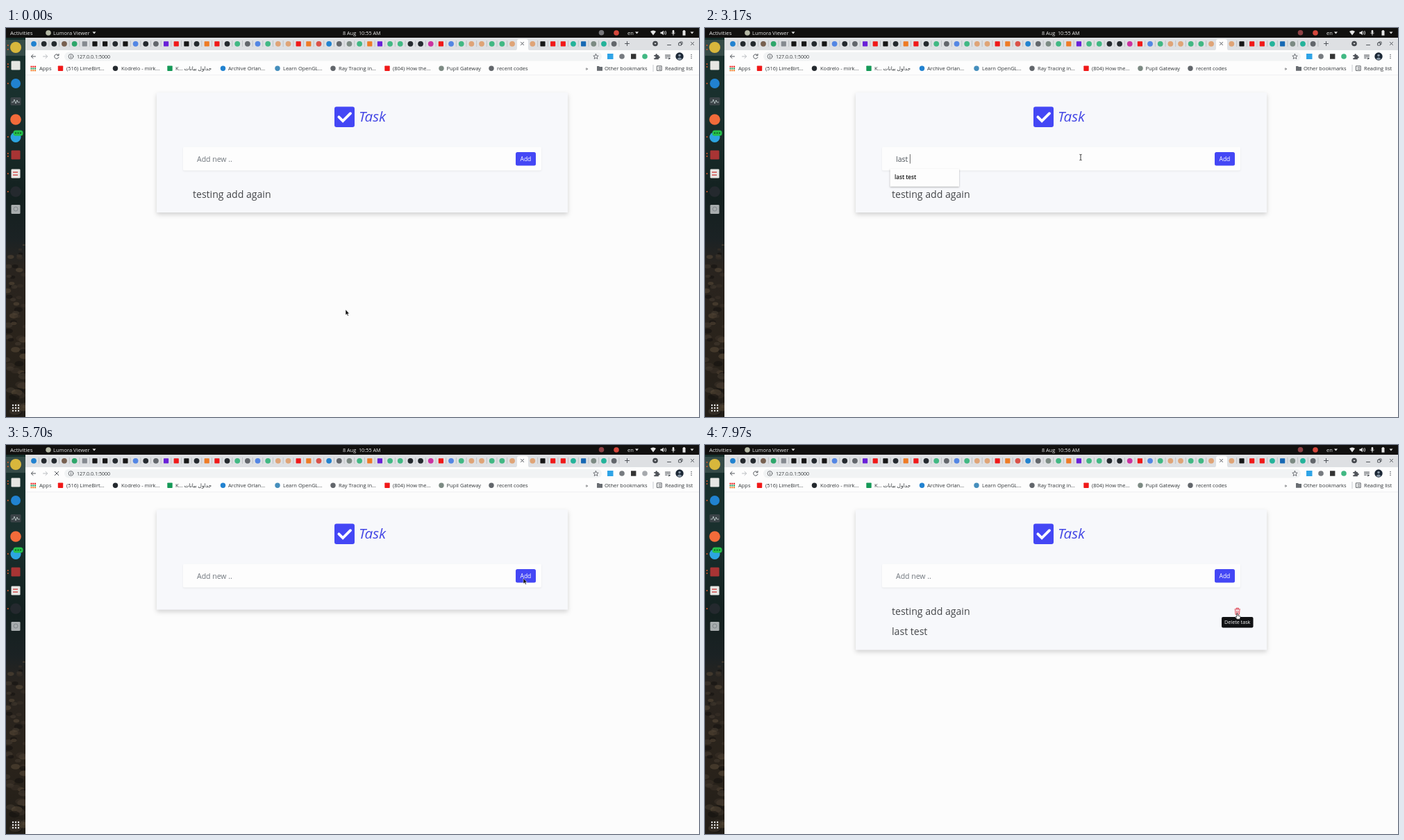
An HTML page that plays this animation: 998 px wide and 561 px high, repeating every 8 s.

```html
<!DOCTYPE html>
<html lang="en">
<head>
<meta charset="utf-8">
<title>Task list</title>
<style>
  html, body { margin: 0; width: 100%; height: 100%; overflow: hidden; background: #fcfcfc; }
  svg { display: block; width: 998px; height: 561px; }
  text { font-family: "Open Sans", "DejaVu Sans", sans-serif; white-space: pre; }
  .top { font-size: 7.5px; fill: #e6e6e6; }
  .mark { font-size: 7.5px; fill: #33373a; }
  .line { fill: none; stroke: #50545a; stroke-width: 1; stroke-linecap: round; stroke-linejoin: round; }
  .item { font-size: 14.1px; fill: #444649; }
  .field { font-size: 10.5px; }
  .option { font-size: 8.1px; font-weight: 600; fill: #111; }
  #card { filter: drop-shadow(0 3px 3px rgba(0, 0, 0, .17)); }
  #menu { filter: drop-shadow(0 1px 1px rgba(0, 0, 0, .3)); }
  #box { filter: drop-shadow(0 1px 1px rgba(0, 0, 0, .07)); }
</style>
</head>
<body>
<svg viewBox="0 0 998 561">
  <defs>
    <linearGradient id="wall" x2="0" y2="1">
      <stop offset="0" stop-color="#17302c"/>
      <stop offset=".2" stop-color="#1a302e"/>
      <stop offset=".42" stop-color="#13201f"/>
      <stop offset=".53" stop-color="#1b2224"/>
      <stop offset=".6" stop-color="#29241f"/>
      <stop offset=".8" stop-color="#2a231b"/>
      <stop offset="1" stop-color="#221e18"/>
    </linearGradient>
    <clipPath id="side"><path d="M0 14H28V561H0z"/></clipPath>
  </defs>

  <!-- page -->
  <rect width="998" height="561" fill="#fcfcfc"/>
  <rect id="card" x="217" y="93" width="592" height="173" fill="#f7f8fb"/>
  <rect x="473" y="113.5" width="29" height="29.5" rx="3" fill="#4447f5"/>
  <path d="M479.4 128.4l5.7 5.7 10.9-10.9" fill="none" stroke="#fff" stroke-width="3.9" stroke-linecap="round"/>
  <text x="508" y="135.3" font-size="20.6" font-style="italic" fill="#4447e5">Task</text>
  <rect id="box" x="255" y="171.5" width="516" height="34" rx="2" fill="#fdfdfd"/>
  <text id="hint" class="field" x="275" y="192.5" fill="#70767d">Add new ..</text>
  <text id="typed" class="field" x="275" y="192.5" fill="#495057"></text>
  <path id="caret" d="M0 182v13.5" stroke="#444" stroke-width=".8"/>
  <rect x="734" y="179" width="29" height="19.5" rx="2.5" fill="#4447f5"/>
  <text x="740.5" y="191.8" font-size="8.5" fill="#fff">Add</text>
  <text id="first" class="item" x="269" y="244.8">testing add again</text>
  <text id="second" class="item" x="269" y="273.8">last test</text>
  <g id="trash" fill="none" stroke="#dc3545">
    <path d="M762.5 237h8.5M765 236.5v-1.2h3.5v1.2"/>
    <path d="M763.6 238l.4 6.3h5.5l.4-6.3M765.7 239v4M767.8 239v4" stroke-width=".9"/>
  </g>
  <g id="tip">
    <rect x="744" y="248" width="45.5" height="15.5" rx="2" fill="#111214"/>
    <text x="766.7" y="258.2" font-size="7.2" fill="#f4f4f4" text-anchor="middle">Delete task</text>
  </g>
  <g id="menu">
    <rect id="sheet" x="266.5" y="203" width="99.5" height="119" fill="#fdfdfd"/>
    <g id="options"></g>
  </g>

  <!-- browser -->
  <rect x="28" y="14" width="970" height="18" fill="#dee0e3"/>
  <rect x="28" y="32" width="970" height="35.5" fill="#fdfdfd"/>
  <path d="M28 67.8H998" stroke="#eceef0" stroke-width=".8"/>
  <path d="M734 32q2 0 2-3V19q0-3 3-3h10q3 0 3 3v10q0 3 2 3z" fill="#fdfdfd"/>
  <g id="tabs"></g>
  <path class="line" d="M741.5 20.5l4 4m0-4l-4 4M891.5 22.5h6m-3-3v6M952.5 24.5h5M969 21.5h3.5v3.5h-3.5zM970.5 21.5v-1.5h3.5v3.5h-1.3M986.5 20.5l4 4m0-4l-4 4"/>
  <circle cx="935" cy="22.5" r="3.8" fill="#44484d"/>
  <path d="M933.3 21.7h3.4l-1.7 2z" fill="#fff"/>
  <rect x="84" y="34.8" width="774" height="12.6" rx="6.3" fill="#f1f3f4"/>
  <path class="line" d="M42.5 41h-6m2.5-2.6L36.3 41l2.7 2.6"/>
  <path class="line" d="M53.5 41h6m-2.5-2.6l2.7 2.6-2.7 2.6" style="stroke:#b9bcc0"/>
  <path id="reload" class="line" d="M75.6 39.2a3.2 3.2 0 1 0 .4 3M76 37.5v2.3h-2.3"/>
  <path id="stop" class="line" d="M70.3 38.3l5.4 5.4m0-5.4l-5.4 5.4"/>
  <circle class="line" cx="93.5" cy="41" r="3.4" style="stroke-width:.8"/>
  <path class="line" d="M93.5 40.8v1.8M93.5 39.2v.1" style="stroke-width:.9"/>
  <text class="mark" x="102" y="43.8" style="font-size:7.1px">127.0.0.1:5000</text>
  <path class="line" d="M849.5 37.5l1.1 2.4 2.6.3-2 1.7.6 2.6-2.3-1.4-2.3 1.4.6-2.6-2-1.7 2.6-.3z" style="stroke-width:.8"/>
  <rect x="866" y="37" width="8.5" height="8" fill="#2fa4e7"/>
  <circle cx="887" cy="41" r="3.8" fill="#777b80"/>
  <rect x="900" y="37.3" width="7.4" height="7.4" fill="#333"/>
  <circle id="badge" cx="920" cy="41" r="3.8"/>
  <path d="M933.3 39h2.2a1.3 1.3 0 1 1 2.4 0h2v2a1.3 1.3 0 1 1 0 2.4v1.8h-6.6v-2.2a1.3 1.3 0 1 0 0-2z" fill="#50545a"/>
  <path class="line" d="M949.5 39h7M949.5 41h7M949.5 43.2h3"/>
  <path d="M954 42.2l3.5 1.6-3.5 1.8z" fill="#50545a"/>
  <circle cx="970" cy="41" r="5.7" fill="#1b2735"/>
  <path d="M966.5 44.5q3.5-4 7 0-3.5 3-7 0z" fill="#8795a4"/>
  <circle cx="970" cy="39.5" r="1.8" fill="#8795a4"/>
  <path d="M987 38.5v.1m0 2.4v.1m0 2.4v.1" class="line" style="stroke-width:1.5"/>
  <g id="marks"></g>
  <path d="M851 55h3l1 1h4v5.7h-8z" fill="#686c71"/>
  <path d="M932 53v10" stroke="#c8cbd0"/>
  <path class="line" d="M937.8 54.8h6.4v6.6h-6.4zM940 57h2.8M940 59.3h2.8" style="stroke-width:.9"/>

  <!-- desktop -->
  <rect width="998" height="14" fill="#11100f"/>
  <text class="top" x="6" y="9.8" style="font-size:7.9px">Activities</text>
  <circle cx="61" cy="7" r="3.8" fill="#b5b8a5"/>
  <text class="top" x="68" y="9.8">Lumora Viewer</text>
  <text id="clock" class="top" x="485" y="9.8" style="font-size:7.3px"></text>
  <text class="top" x="895" y="9.8">en</text>
  <g fill="#e6e6e6">
    <path d="M124.5 5.5h5l-2.5 3zM906 5.5h5l-2.5 3zM985.5 5.5h5l-2.5 3z"/>
    <path d="M928 5q4-3 8 0l-4 5.5zM942.5 5.8h1.8l2.5-2v6.4l-2.5-2h-1.8z"/>
    <rect x="959.7" y="3" width="2.6" height="5" rx="1.3"/>
    <path d="M974.5 4h1v-1h2v1h1v6.7h-4z"/>
  </g>
  <path d="M948 4.8q1.5 2.2 0 4.4M949.7 4q2.2 3 0 6M958.5 6.8q2.5 4 5 0M961 9v2" fill="none" stroke="#e6e6e6" stroke-width=".8"/>
  <circle id="rec" cx="857.5" cy="6.8" r="3.8"/>
  <circle cx="879" cy="7" r="3.8" fill="#d6473c"/>
  <g clip-path="url(#side)">
    <rect y="14" width="28" height="547" fill="url(#wall)"/>
    <g id="leaves"></g>
    <rect y="17" width="28" height="23" fill="#fff" opacity=".13"/>
  </g>
  <g id="dock"></g>
  <rect x="6.5" y="100" width="15" height="11.5" rx="1.5" fill="#3c4448"/>
  <path d="M8 107h2.5l1.5-4 2 6 2-5 1 3h3" fill="none" stroke="#c5d2d2" stroke-width=".8"/>
  <rect x="10.5" y="147.5" width="14" height="8" rx="3.5" fill="#25c04a"/>
  <path d="M13 151.5h2m1.5 0h2m1.5 0h2" stroke="#0c4c1c" stroke-width="1.6"/>
  <path d="M10 208h7M10 212h7" stroke="#d04e4e" stroke-width="1.6"/>
  <circle cx="14" cy="261" r="3" fill="none" stroke="#81878a"/>
  <g id="grid" fill="#e8e8e8"></g>

  <!-- pointer -->
  <g id="pointer">
    <path id="arrow" d="M0 0v8l1.8-1.6 1.3 2.8 1.2-.6-1.2-2.7h2.3z" fill="#111" stroke="#fff" stroke-width=".5"/>
    <path id="beam" d="M-1.6-4.2q1.6 0 1.6 1v6.4q0 1 1.6 1M1.6-4.2q-1.6 0-1.6 1M0 3.2q0 1-1.6 1" fill="none" stroke="#222" stroke-width=".9"/>
    <path id="hand" d="M-.8 0q.8-.9 1.5 0v3l3 .7q1 .4.8 1.8l-.8 2.7h-4.2l-2.4-3q.2-1 1.2-.6l.9.8z" fill="#fff" stroke="#111" stroke-width=".7"/>
  </g>
</svg>
<script>
const LOOP = 8000;
const $ = id => document.getElementById(id);

function add(parent, tag, attrs, content = '') {
  const node = document.createElementNS('http://www.w3.org/2000/svg', tag);
  for (const key in attrs) node.setAttribute(key, attrs[key]);
  node.textContent = content;
  return $(parent).appendChild(node);
}

// Capital letters give squares, small letters circles.
const COLORS = {
  b: '#2182d0', B: '#1668b4', k: '#24292e', K: '#161616', n: '#776050', e: '#2da66a',
  D: '#858a90', g: '#5386e4', o: '#62666b', P: '#6a20d8', R: '#f01818', O: '#ee7b25',
  v: '#41b883', s: '#dfa477', m: '#da5148', d: '#7c8a83', j: '#cb32a0', t: '#24b39a',
  G: '#159957', W: '#e6e6e3', y: '#d8b73c', T: '#a83434', l: '#2ca5e0', A: '#a8adae',
  c: '#458ebc', p: '#f26b3a'
};

function dot(parent, key, x, y, r) {
  const fill = COLORS[key];
  if (key === key.toLowerCase()) add(parent, 'circle', { cx: x, cy: y, r, fill });
  else add(parent, 'rect', { x: x - r, y: y - r, width: 2 * r, height: 2 * r, rx: r / 5, fill });
}

[...'bkkneDKKkKgkoPRKkORkvogvssROmbodvOPvvkkjRgvssvvs sKRRtBdto'].forEach((key, i) => {
  const x = 40 + 14.66 * i;
  if (key === ' ') return;
  dot('tabs', key, x, 22.8, key === key.toLowerCase() ? 3.9 : 3.6);
  if (i !== 47) add('tabs', 'path', { d: `M${x + 7.3} 18v9`, stroke: '#a9adb3', 'stroke-width': .6 });
});

[
  ['', 39, 48, 'Apps'], ['R', 78.5, 87, '(516) LimeBirt…'], ['k', 157.5, 166, 'Kodrelo - mirk…'],
  ['G', 236, 244, 'K… جداول بيانات'], ['b', 312.5, 320, 'Archive Orlan…'], ['c', 391, 399, 'Learn OpenGL…'],
  ['o', 471, 479, 'Ray Tracing in…'], ['R', 549, 557, '(804) How the…'], ['d', 627, 634.5, 'Pupil Gateway'],
  ['o', 699, 707, 'recent codes'], ['', 0, 834.5, '»'], ['', 0, 862, 'Other bookmarks'], ['', 0, 949, 'Reading list']
].forEach(([key, x, textX, label]) => {
  if (key) dot('marks', key, x, 58.2, 3.7);
  add('marks', 'text', { class: 'mark', x: textX, y: 61 }, label);
});

for (let i = 0; i < 9; i++) {
  const col = i % 3, row = i / 3 | 0;
  add('marks', 'rect', { x: 35.5 + col * 2.8, y: 54.7 + row * 2.8, width: 2, height: 2, fill: COLORS['RGO'[row]] });
  add('grid', 'circle', { cx: 10 + col * 4, cy: 544 + row * 4, r: 1.2 });
}

[['y', 28, 8], ['W', 54, 6.5], ['b', 80, 7], ['p', 132, 7.8], ['l', 157.5, 7.5], ['T', 183, 6.5],
 ['W', 210, 6.5], ['k', 236, 7.8], ['A', 261.5, 6.5]].forEach(([key, y, r]) => dot('dock', key, 14, y, r));
for (const y of [25, 31, 52, 56, 80, 157, 181, 185, 210, 236])
  add('dock', 'circle', { cx: 2.8, cy: y, r: 1, fill: '#d85b2c' });

// Small leaves above, larger stones towards the bottom.
let seed = 7;
const random = () => (seed = seed * 16807 % 2147483647) / 2147483647;
for (let i = 0; i < 60; i++) {
  const depth = i / 60, size = 2 + 4 * depth + random() * 3;
  const fill = ['#5a4a38', '#3a3128', '#12110f', '#463d31'][i % 4];
  add('leaves', 'ellipse', {
    cx: random() * 28, cy: 310 + depth * 245 + random() * 10, rx: size, ry: size * .6, fill, opacity: .55
  });
}

const options = ['testing add', 'testing add again', 'hi', 'ad', 'make it beatufull', 'last test'];
const rows = options.map((label, i) =>
  add('options', 'text', { class: 'option', x: 273, y: 218 + i * 18.7 }, label));

const PATH = [
  [0, 489, 406], [200, 489, 406], [750, 541, 186.5], [4250, 541, 186.5], [4750, 745, 192],
  [5900, 745, 192], [6500, 634, 329], [6750, 634, 329], [7350, 766.5, 243], [LOOP, 766.5, 243]
];
const FOCUS = 1150, TYPE = 2600, KEY = 130, CLEAR = 5150, LOADED = 6000;
const ENTRY = 'last test ';
const LAST_KEY = TYPE + KEY * (ENTRY.length - 1);

function pointerAt(t) {
  const i = PATH.findIndex(step => step[0] > t);
  const [t0, x0, y0] = PATH[i - 1], [t1, x1, y1] = PATH[i];
  const p = (t - t0) / (t1 - t0), ease = p * p * (3 - 2 * p);
  return [x0 + (x1 - x0) * ease, y0 + (y1 - y0) * ease];
}

const within = (v, low, high) => v >= low && v < high;
const show = (id, on) => { $(id).style.visibility = on ? 'visible' : 'hidden'; };

function render(t) {
  const [x, y] = pointerAt(t);
  const loading = within(t, 5050, LOADED);
  const empty = within(t, CLEAR, LOADED);
  const added = t >= LOADED;

  const inField = within(y, 171.5, 205.5) && within(x, 255, 771);
  const onButton = inField && x >= 734;
  const onTrash = x > 760 && within(y, 234, 246);
  const shape = (onButton && !loading) || onTrash ? 'hand' : inField && x < 734 ? 'beam' : 'arrow';
  $('pointer').setAttribute('transform', `translate(${x} ${y})`);
  for (const id of ['arrow', 'beam', 'hand']) show(id, id === shape);

  $('card').setAttribute('height', empty ? 144.5 : added ? 202.5 : 173);
  show('first', !empty);
  show('second', added);
  show('trash', t > 6750 && within(y, 229, 257));
  $('tip').style.opacity = Math.min(1, Math.max(0, (t - 7500) / 150));

  const count = within(t, TYPE, CLEAR) ? Math.min(ENTRY.length, Math.floor((t - TYPE) / KEY) + 1) : 0;
  $('typed').textContent = ENTRY.slice(0, count);
  show('hint', !count);
  const blinkFrom = count ? TYPE + KEY * (count - 1) : FOCUS;
  show('caret', within(t, FOCUS, 4900) && (t - blinkFrom) % 1200 < 600);
  const width = count ? $('typed').getComputedTextLength() : 0;
  $('caret').setAttribute('transform', `translate(${275.4 + width} 0)`);

  const full = within(t, FOCUS, 1900);
  const fade = 1 - (t - LAST_KEY) / 178;
  $('menu').style.opacity = full ? 1 : t >= TYPE ? Math.max(0, Math.min(1, fade)) : 0;
  $('sheet').setAttribute('height', full ? 119 : 25.7);
  rows.forEach((row, i) => { row.style.display = full || i === 5 ? '' : 'none'; });
  rows[5].setAttribute('y', full ? 311.5 : 218);

  show('reload', !loading);
  show('stop', loading);
  $('badge').setAttribute('fill', loading ? '#a6a9ad' : '#41b883');
  $('rec').setAttribute('fill', t < 400 ? '#77767a' : '#8d4145');
  $('clock').textContent = t < 7100 ? '8 Aug  10:55 AM' : '8 Aug  10:56 AM';
}

const start = performance.now();
function tick() {
  render((performance.now() - start) % LOOP);
  requestAnimationFrame(tick);
}
tick();
</script>
</body>
</html>
```
